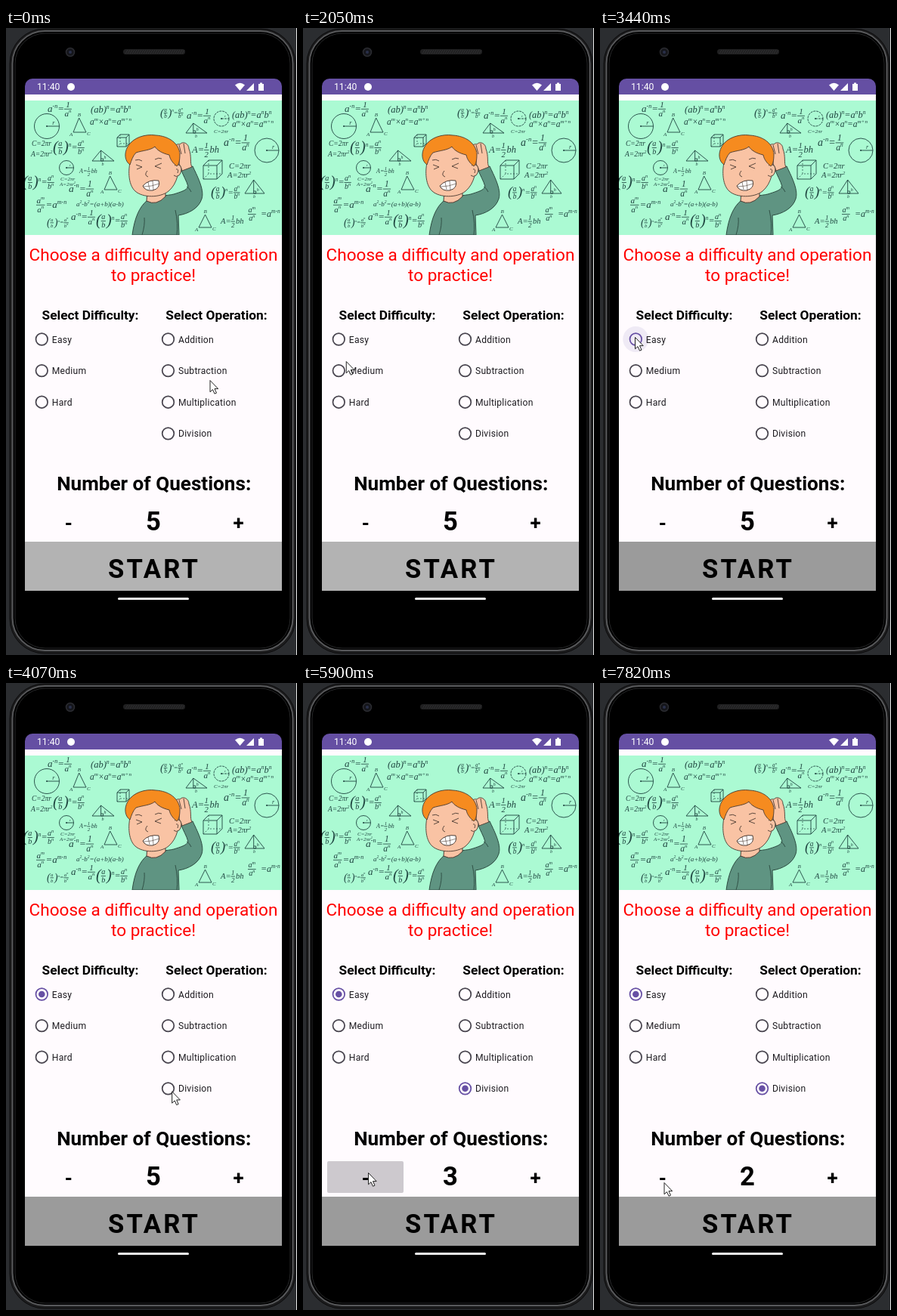
These frames come from a looping animation (385 px wide and 830 px high, 8000 ms). An HTML page with a canvas:

```html
<!DOCTYPE html>
<html lang="en">
<head>
<meta charset="utf-8">
<title>Maths practice</title>
<style>
html, body { margin: 0; width: 100%; height: 100%; overflow: hidden; background: #2b2d30; }
canvas { display: block; width: 385px; height: 830px; }
</style>
</head>
<body>
<canvas></canvas>
<script>
const canvas = document.querySelector('canvas');
const c = canvas.getContext('2d');
const dpr = window.devicePixelRatio || 1;
canvas.width = 385 * dpr;
canvas.height = 830 * dpr;

const LOOP = 8000, PURPLE = '#6750a4', GREY = '#49454f', PAPER = '#fffbfe', INK = '#1f4540';
const SANS = 'Roboto, sans-serif', SERIF = '"Liberation Serif", serif';
const clamp = v => Math.max(0, Math.min(1, v));

function rect(x, y, w, h, fill) {
  c.fillStyle = fill;
  c.fillRect(x, y, w, h);
}

function round(x, y, w, h, r, fill, stroke, width = 1) {
  c.beginPath();
  c.roundRect(x, y, w, h, r);
  paint(null, fill, stroke, width);
}

function circle(x, y, r, fill, stroke, width = 1) {
  c.beginPath();
  c.arc(x, y, r, 0, 7);
  paint(null, fill, stroke, width);
}

function paint(d, fill, stroke, width = 1) {
  const path = d && new Path2D(d);
  c.lineWidth = width;
  c.lineJoin = 'round';
  if (fill) { c.fillStyle = fill; path ? c.fill(path) : c.fill(); }
  if (stroke) { c.strokeStyle = stroke; path ? c.stroke(path) : c.stroke(); }
}

function text(s, x, y, size, { weight = 400, color = '#000', align = 'center', spacing = 0 } = {}) {
  c.font = `${weight} ${size}px ${SANS}`;
  c.fillStyle = color;
  c.textAlign = align;
  c.letterSpacing = spacing + 'px';
  c.fillText(s, x, y);
  c.letterSpacing = '0px';
}

// Maths notation: ^n raises a sign, [a|b] is a fraction, { } are tall brackets. Returns the end x.
function maths(s, x, y, size, show = true) {
  for (const [sign, up, top, low] of s.matchAll(/\^(.)|\[(.*?)\|(.*?)\]|./g)) {
    if (top) {
      const wide = [top, low].map(part => maths(part, 0, 0, size * .85, false));
      const w = Math.max(...wide) + 1;
      if (show) {
        maths(top, x + (w - wide[0]) / 2, y - size * .5, size * .85);
        maths(low, x + (w - wide[1]) / 2, y + size * .45, size * .85);
        rect(x, y - size * .32, w, .8, INK);
      }
      x += w + 1;
      continue;
    }
    const tall = sign === '{' || sign === '}';
    const glyph = tall ? (sign === '{' ? '(' : ')') : up || sign;
    c.font = `italic ${size * (up ? .62 : tall ? 1.7 : 1)}px ${SERIF}`;
    c.textAlign = 'left';
    if (show) {
      c.fillStyle = INK;
      c.fillText(glyph, x, y + (up ? -size * .42 : tall ? size * .2 : 0));
    }
    x += c.measureText(glyph).width;
  }
  return x;
}

const POWER = 'a^-^n=[1|a^n]', RATIO = '{[a|b]}^n=[a^n|b^n]', PRODUCT = '(ab)^n=a^nb^n',
      SUM = 'a^m×a^n=a^m^+^n', AREA = 'A=[1|2]bh', ROUND = 'C=2πr', DISC = 'A=2πr^2';
const formulas = [
  [POWER, 55, 111, 13], [PRODUCT, 112, 112, 12.5], [SUM, 111, 128, 11.5],
  [RATIO, 204, 115, 8.5], [POWER, 239, 120, 13], [ROUND, 275, 139, 7],
  [PRODUCT, 299, 119, 12.3], [SUM, 299, 131, 11.5], [POWER, 288, 156, 14],
  [ROUND, 34, 156, 9.5], [DISC, 33, 170, 9.5], [RATIO, 62, 162, 12],
  [ROUND, 72, 202, 7], [DISC, 71, 209, 7], [AREA, 97, 192, 8], [RATIO, 22, 208, 12],
  [POWER, 83, 217, 13.5], ['[a^m|a^n]=a^m^-^n', 40, 238, 13],
  ['a^2-b^2=(a+b)(a-b)', 93, 236, 9], [RATIO, 54, 260, 8], [POWER, 86, 254, 13],
  [RATIO, 119, 259, 12], [AREA, 246, 165, 12.5], [ROUND, 295, 186, 10.5],
  [DISC, 293, 198, 10.5], [RATIO, 271, 221, 11], [AREA, 284, 259, 10.5],
  ['[a^m|a^n]', 320, 250, 12], ['=a^m^-^n', 337, 250, 12]
];

function triangle(x, y, w, h, apex, height) {
  const top = x + w * apex;
  paint(`M${x} ${y}L${top} ${y - h}L${x + w} ${y}Z` + (height ? `M${top} ${y - h}V${y}h3v-3h-3` : ''), null, INK, .9);
  if (height) {
    maths('h', top + 4, y - 3, 6);
    maths('b', x + w / 2 - 2, y + 6, 6);
  } else {
    maths('A', x - 5, y + 5, 7);
    maths('B', top - 2, y - h - 2, 7);
    maths('C', x + w + 1, y + 4, 7);
  }
}

function cube(x, y, s, d) {
  paint(`M${x} ${y + d}h${s}v${s}h${-s}zl${d} ${-d}h${s}l${-d} ${d}m${d} ${-d}v${s}l${-d} ${d}`, null, INK, .9);
  c.setLineDash([2, 2]);
  paint(`M${x + d} ${y}v${s}h${s}m${-s} 0l${-d} ${d}`, null, INK, .7);
  c.setLineDash([]);
}

function wheel(x, y, r) {
  circle(x, y, r, null, INK, .9);
  circle(x, y, 1, INK);
  paint(`M${x} ${y}h${r}`, null, INK, .9);
  maths('r', x + r / 2 - 1, y - 2, r * .5);
}

function boy() {
  const line = '#4a3a32', seam = '#2c4a40', skin = '#f9c3a4';
  paint('M167 274C170 252 176 237 187 228C200 222 213 222 222 220C231 217 239 215 241 210C239 202 234 195 232 188L247 183C252 194 263 214 259 226C255 239 241 246 228 248L229 274Z', '#5f9482', seam);
  paint('M187 216L186 229Q199 236 211 223L211 212Z', skin, line);
  paint('M226 274Q228 259 224 241M180 274Q184 261 183 251M239 210q4 2 6 7', null, seam, .9);
  paint('M224 170C220 161 223 152 230 154C234 149 242 153 242 160C246 170 243 179 246 184L233 189C230 179 226 177 224 170ZM229 155l3 12M235 153l2 13', skin, line, .9);
  paint('M166 170C161 186 161 207 171 216C181 225 204 225 215 216C227 206 230 188 229 172C226 154 174 150 166 170Z', skin, line, .9);
  paint('M222 183C231 177 235 188 229 195Q224 199 220 194Z', skin);
  paint('M223 182C231 177 235 188 229 195Q225 198 222 195M225 187q4-1 2 5', null, line, .9);
  paint('M164 181C157 176 156 166 161 157C168 145 184 140 198 142C216 143 229 153 230 167C230 175 229 180 226 183C221 179 217 174 216 168C207 166 200 162 197 157C191 162 181 162 172 165C168 169 166 175 164 181Z', '#f68b1f', line, .9);
  paint('M172 181l8 3l-7 3M206 179l-9 4l8 3M171 175q5-2 9 1M197 174q5-3 9-1M187 189q-5 6 1 8', null, line, .9);
  paint('M181 209Q189 200 202 202Q205 212 194 215Q184 216 181 209Z', '#fff', line);
  paint('M182 210q10 0 21-4M188 204l2 10M194 202l1 13', null, line, .6);
}

function banner() {
  c.save();
  c.beginPath();
  c.rect(25, 96, 340, 178);
  c.clip();
  rect(25, 96, 340, 178, '#abfad3');
  formulas.forEach(f => maths(...f));
  wheel(54, 130, 16.5);
  wheel(345, 162, 16);
  wheel(80, 185, 9.5);
  c.setLineDash([3, 1]);
  wheel(285, 120, 10);
  c.setLineDash([]);
  triangle(89, 138, 17, 19, .45);
  triangle(130, 214, 17, 18, .45);
  triangle(255, 264, 17, 17, .5);
  triangle(238, 139, 28, 13, .35, true);
  triangle(114, 176, 29, 14, .4, true);
  triangle(316, 219, 26, 18, .45, true);
  cube(147, 141, 12, 4);
  cube(261, 175, 18, 7);
  boy();
  c.restore();
}

function phone() {
  rect(0, 0, 385, 830, '#2b2d30');
  round(5, 1, 378, 827, 46, '#1c1c1d', '#0c0c0d');
  round(8.5, 4, 371, 820, 43, '#000', '#58595b', 2);
  round(12, 7, 364, 814, 40, '#000', '#262728');
  rect(384, 0, 1, 830, '#e8e8e8');
  circle(85, 32, 5.5, '#15161b', '#2b2c31', 1.5);
  circle(85, 32, 2, '#29304a');
  round(155, 28, 82, 7, 3.5, '#202021');
  for (let x = 158; x < 235; x += 3) paint(`M${x} 34l3-5`, null, '#343436', .8);
  rect(25, 88, 340, 657, PAPER);
  round(25, 67, 340, 21, [10, 10, 0, 0], '#654fa3');
  text('11:40', 41, 82, 12.2, { color: '#fff', align: 'left' });
  circle(86, 78, 5, '#fff');
  paint('M303 75.5Q309.5 70 316 75.5L309.5 83ZM318 83L328 73V83ZM334 74H336V72.5H339V74H341V83H334Z', '#fff');
  round(148, 754, 94, 3, 1.5, '#f2f2f2');
}

function radio(label, x, y, age) {
  const on = age >= 0;
  if (on && age < 520) {
    c.globalAlpha = .1 * clamp((520 - age) / 150);
    circle(x, y, 12 + 5 * clamp(age / 100), PURPLE);
    c.globalAlpha = 1;
  }
  circle(x, y, 7.8, null, on ? PURPLE : GREY, 1.75);
  if (age >= 150) circle(x, y, 4.3, PURPLE);
  text(label, x + 13.5, y + 4.5, 12.12, { color: '#1d1b20', align: 'left', spacing: .24 });
}

function screen(t) {
  const bold = { weight: 700 }, red = { color: '#f00' };
  text('Choose a difficulty and operation', 195, 308, 22.55, red);
  text('to practice!', 195, 335, 22.55, red);
  text('Select Difficulty:', 111.5, 386, 17.32, bold);
  text('Select Operation:', 278.5, 386, 17.32, bold);
  ['Easy', 'Medium', 'Hard'].forEach((s, i) => radio(s, 47.3, 412 + i * 41.6, i ? -1 : t - 3320));
  ['Addition', 'Subtraction', 'Multiplication', 'Division']
    .forEach((s, i) => radio(s, 214.5, 412 + i * 41.6, i < 3 ? -1 : t - 4550));
  text('Number of Questions:', 195.7, 612, 26.1, bold);

  c.globalAlpha = t < 5480 || t >= 6530 ? 0 : t < 5600 || t >= 6410 ? .5 : 1;
  round(32, 633, 101, 42, 2, '#cdc9ce');
  c.globalAlpha = 1;
  const count = 5 - [5600, 5750, 6140].filter(at => t >= at).length;
  text('-', 82.7, 664, 26, bold);
  text(count, 195, 665, 34.64, bold);
  text('+', 307.5, 664, 26, bold);

  rect(25, 680, 340, 65, t < 3320 ? '#b3b3b3' : '#9b9b9b');
  text('START', 135, 728, 34.64, { weight: 700, align: 'left', spacing: 3.09 });
}

// Pointer moves: start time, steps of 120 ms, end x, y, optional curve control x, y.
const moves = [
  [140, 7, 54, 399, 160, 282], [1010, 2, 45.5, 411], [1510, 2, 50, 471], [1780, 2, 51, 474],
  [2050, 2, 52, 410, 62, 440], [2320, 1, 50, 408], [2570, 5, 49, 409, 179, 503],
  [3200, 3, 46, 409], [3560, 4, 221, 539], [4070, 3, 215.5, 543],
  [4700, 3, 100, 653, 125, 640], [5090, 3, 86, 648], [6410, 3, 164.5, 715],
  [7280, 3, 105, 668], [7670, 1, 89, 664], [7820, 1, 84.5, 661]
];

function pointer(t) {
  let x = 269.5, y = 466;
  for (const [at, steps, ex, ey, cx = (x + ex) / 2, cy = (y + ey) / 2] of moves) {
    if (t < at) break;
    const u = Math.min(1, (Math.floor((t - at) / 120) + 1) / steps), v = 1 - u;
    x = v * v * x + 2 * u * v * cx + u * u * ex;
    y = v * v * y + 2 * u * v * cy + u * u * ey;
  }
  c.save();
  c.translate(x, y);
  paint('M.5 .5V15.8L4 12.6L6.5 18.2L9 17.1L6.5 11.6H11.2Z', '#fff', '#222');
  c.restore();
}

function draw() {
  const t = performance.now() % LOOP;
  c.setTransform(dpr, 0, 0, dpr, 0, 0);
  phone();
  banner();
  screen(t);
  pointer(t);
  requestAnimationFrame(draw);
}
draw();
</script>
</body>
</html>
```
